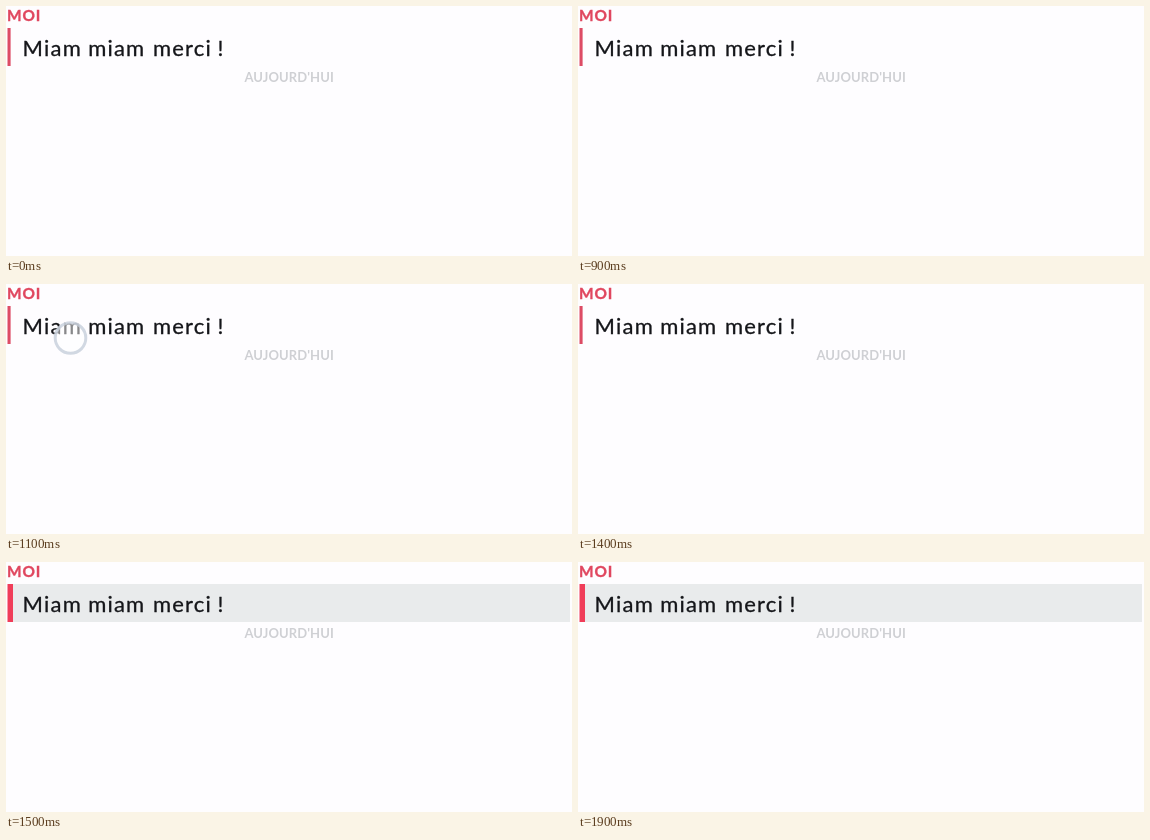
These frames come from a looping animation (566x250 px, 3200 ms). An HTML page:

```html
<!DOCTYPE html>
<html lang="fr">
<head>
<meta charset="utf-8">
<title>Message</title>
<style>
  html, body { margin: 0; width: 100%; height: 100%; overflow: hidden; background: #fefdff; }
  svg { display: block; width: 566px; height: 250px; font-family: Lato, "Open Sans", sans-serif; }
  .sender { font-size: 15.4px; font-weight: 700; letter-spacing: .9px; fill: #e0475f; stroke: #e0475f; stroke-width: .35px; }
  .message { font-size: 22px; letter-spacing: 1.2px; fill: #15161a; stroke: #15161a; stroke-width: .3px; }
  .day { font-size: 13px; font-weight: 700; letter-spacing: .1px; fill: #cfd0d4; text-anchor: middle; }
  .plain { fill: #dd4c65; }
  .saved, .tap { opacity: 0; }
  .plain, .saved, .tap { animation: 3200ms step-end infinite; }
  .plain { animation-name: hide; }
  .saved { animation-name: show; }
  .tap { animation-name: tap; }
  @keyframes hide { 0% { opacity: 1; } 46.875%, 100% { opacity: 0; } }
  @keyframes show { 0% { opacity: 0; } 46.875%, 100% { opacity: 1; } }
  /* touch at 1100 ms, released by 1400 ms */
  @keyframes tap {
    0% { opacity: 0; }
    34.375% { opacity: .9; }
    37.5% { opacity: 1; }
    40.625% { opacity: .5; }
    43.75%, 100% { opacity: 0; }
  }
</style>
</head>
<body>
<svg viewBox="0 0 566 250">
  <text class="sender" x="1" y="15">MOI</text>
  <rect class="plain" x="1.5" y="22" width="3.1" height="38"/>
  <g class="saved">
    <rect x="2" y="22" width="562" height="38" fill="#e9ebec"/>
    <rect x="1.5" y="22" width="5.5" height="38" fill="#f03d59"/>
  </g>
  <text class="message" y="50"><tspan x="16.6">Miam</tspan> <tspan x="82.2">miam</tspan> <tspan x="147">merci</tspan> <tspan x="211.4">!</tspan></text>
  <text class="day" x="283.2" y="76">AUJOURD'HUI</text>
  <circle class="tap" cx="64.5" cy="54" r="15.3" fill="#fff" fill-opacity=".55" stroke="#cdd4df" stroke-width="3"/>
</svg>
</body>
</html>
```
